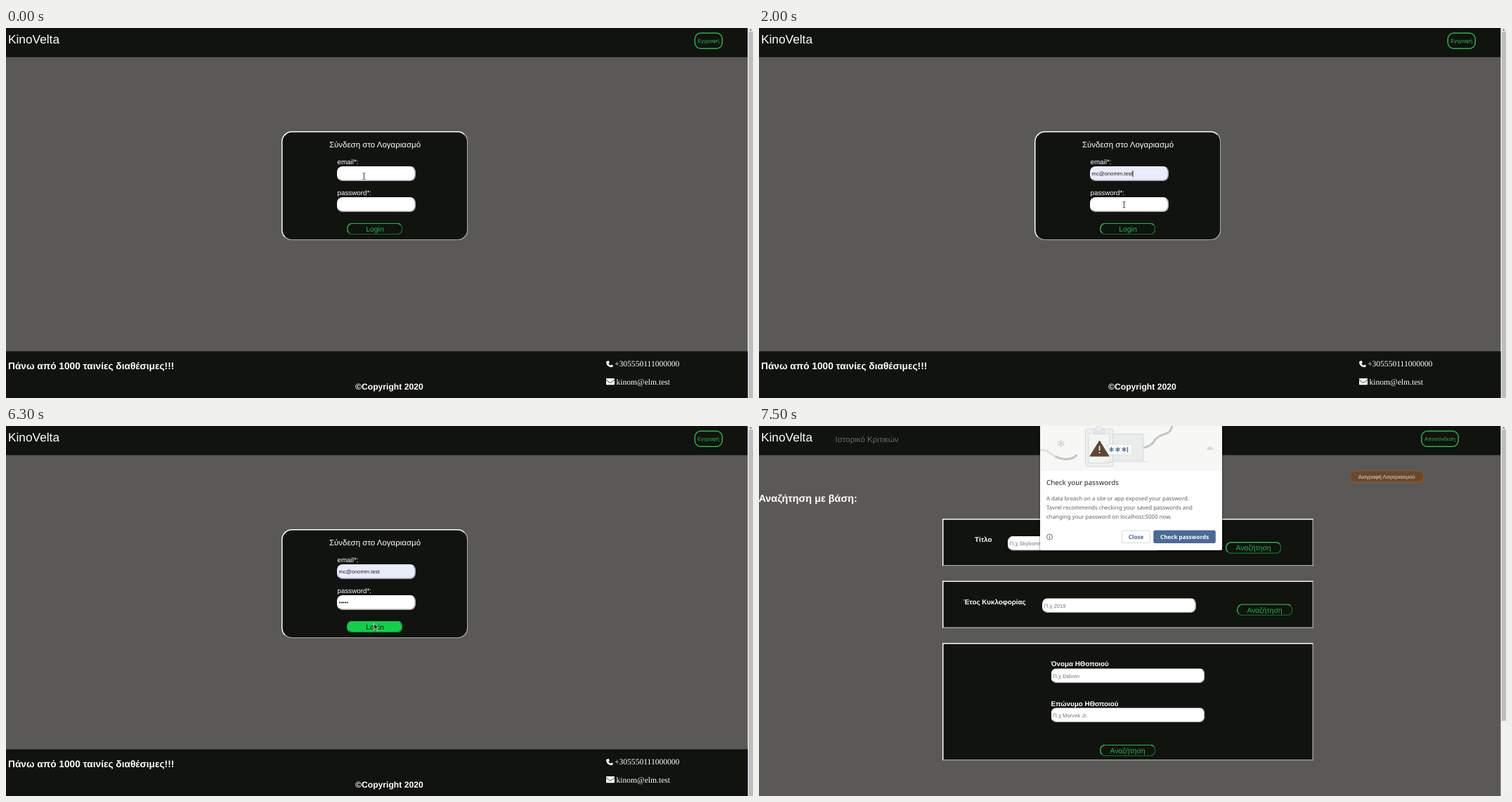
Animation, 1063 px wide and 527 px high, one loop 7700 ms. Source, as an HTML page:

```html
<!DOCTYPE html>
<html lang="el">
<head>
<meta charset="utf-8">
<title>KinoVelta</title>
<style>
html, body { margin: 0; width: 100%; height: 100%; overflow: hidden; background: #5a5957; }
#stage { position: absolute; left: 0; top: 0; width: 1063px; height: 527px; overflow: hidden; background: #5a5957; }
.layer, svg { position: absolute; left: 0; top: 0; width: 1063px; height: 527px; overflow: hidden; }
.box { position: absolute; left: 0; top: 0; box-sizing: border-box; transform-origin: 0 0; }
.dark { background: #10130e; }
.panel { background: #10130e; border: 3px solid; border-color: #fff #a2a2a0 #a2a2a0 #fff; }
.round { border-radius: 30px; }
.input { background: #fff; border: 3px solid; border-color: #fff #a9a9ab #a9a9ab #fff; border-radius: 16px; }
.filled { background: #e8ecfb; border-color: #e8ecfb #9d9fac #9d9fac #e8ecfb; }
.button { border: 3px solid; border-color: #28b550 #16602d #16602d #28b550; border-radius: 16px; }
.hover { background: #10d048; border-color: #10d048 #0a8530 #0a8530 #10d048; }
.pill { border: 3px solid #27b44e; border-radius: 18px; }
.delete { background: #69492e; border: 3px solid; border-color: #7d5433 #8a5a34 #8a5a34 #7d5433; border-radius: 18px; }
.menu { background: #fff; border-radius: 5px; box-shadow: 0 1px 4px #0008; }
.dialog { background: #fff; border-radius: 0 0 4px 4px; box-shadow: 0 2px 6px #0009; }
.close { border: 2px solid #d6d8da; border-radius: 5px; }
.check { background: #4a6a94; border-radius: 5px; }
text { font-family: "Liberation Sans", Arial, sans-serif; fill: #fff; white-space: pre; text-rendering: geometricPrecision; }
.bold { font-weight: 700; }
.serif { font-family: "Liberation Serif", Times, serif; }
.ui { font-family: "Noto Sans", "Open Sans", sans-serif; font-weight: 500; fill: #5f6062; }
.item { font-weight: 600; fill: #282828; }
.title { fill: #222; }
.green { fill: #28b550; }
.value { fill: #222; }
.hint { fill: #757575; }
.faded { fill: #bcb3a8; text-shadow: .6px .4px 0 #bcb3a8aa; }
.blue { font-weight: 600; fill: #46668f; }
.white { font-weight: 600; fill: #fff; }
</style>
</head>
<body>
<div id="stage"></div>
<script>
const LOOP = 7700;
const stage = document.getElementById('stage');
const NS = 'http://www.w3.org/2000/svg';

function layer(parent = stage) {
  const el = document.createElement('div');
  el.className = 'layer';
  parent.append(el);
  return el;
}

// Boxes are built at double size and halved, which keeps fractions of a pixel.
const place = (el, x, y) => { el.style.transform = `translate(${x}px, ${y}px) scale(.5)`; };

function box(parent, x, y, w, h, cls, fill = '') {
  const el = document.createElement('div');
  el.className = 'box ' + cls;
  el.style.width = w * 2 + 'px';
  el.style.height = h * 2 + 'px';
  el.style.background = fill;
  place(el, x, y);
  parent.append(el);
  return el;
}

function drawing(parent, markup = '') {
  const svg = document.createElementNS(NS, 'svg');
  svg.innerHTML = markup;
  parent.append(svg);
  return svg;
}

function text(svg, x, y, size, content, cls = '', anchor = 'start') {
  const el = document.createElementNS(NS, 'text');
  el.setAttribute('x', x);
  el.setAttribute('y', y);
  el.setAttribute('font-size', size);
  el.setAttribute('class', cls);
  el.setAttribute('text-anchor', anchor);
  el.textContent = content;
  svg.append(el);
  return el;
}

const centered = (svg, x, y, size, content, cls) => text(svg, x, y, size, content, cls, 'middle');

const SMALL = 7.7, LABEL = 9.8, BUTTON = 10.4, LINK = 11.55;
const INPUT_HEIGHT = 21, BUTTON_SIZE = [79.5, 17];
const MAILS = ['nel@onomm.test', 'mc@onomm.test', 'zorv@onomm.test',
  'veltomirapanthelokaroud@nimo.test', 'qel@nimo.test', 'taskwander@nimel'];

// Shared frame
const base = layer();
box(base, 0, 0, 1055.5, 41.5, 'dark');
text(drawing(base), 3, 22, 17.3, 'KinoVelta');
box(base, 1055.5, 0, 7.5, 527, '', '#f1f1f1');
const thumb = box(base, 1057, 5, 6, 522, '', '#bdbdbd');
drawing(base, '<path d="M1057.5 3.5l2.2-2.5 2.2 2.5z" fill="#777"/>');

// Login page
const login = layer();
box(login, 0, 460.5, 1055.5, 66.5, 'dark');
box(login, 979.5, 6.5, 40.5, 23.5, 'pill');
box(login, 392, 147, 265.5, 155.5, 'panel round');
const mailInput = box(login, 471, 197, 112, INPUT_HEIGHT, 'input');
box(login, 471, 241, 112, INPUT_HEIGHT, 'input');
const loginButton = box(login, 485, 277.5, ...BUTTON_SIZE, 'button');
const form = drawing(login, `
  <path d="M855.6 474.4l2-.6 1.2 2.9-1.4 1.2q.9 2 2.9 2.9l1.2-1.4 2.4 1.1-.6 2.1q-.5.8-1.8.7-7-.6-7.5-7.5 0-1.1 1.6-1.4z" fill="#fff"/>
  <rect x="854" y="499" width="12" height="9.2" rx="1" fill="#fff"/>
  <path d="M854 501.3q3 2.3 6 4 3-1.7 6-4" fill="none" stroke="#10130e" stroke-width=".8"/>`);
centered(form, 999.7, 20.5, SMALL, 'Εγγραφή', 'green');
centered(form, 525, 170, 11.5, 'Σύνδεση στο Λογαριασμό');
text(form, 471.5, 194.3, LABEL, 'email*:');
text(form, 471.5, 238.3, LABEL, 'password*:');
const loginLabel = centered(form, 525, 289.7, BUTTON, 'Login', 'green');
const mailText = text(form, 473.5, 210.2, SMALL, '', 'value');
const dots = text(form, 473.7, 254, SMALL, '', 'value');
text(form, 3, 486, 13.7, 'Πάνω από 1000 ταινίες διαθέσιμες!!!', 'bold');
text(form, 497, 515, 12.15, '©Copyright 2020', 'bold');
text(form, 866, 482.3, 11.57, '+305550111000000', 'serif');
text(form, 868.5, 507.5, 11.57, 'kinom@elm.test', 'serif');
const caret = box(login, 473.5, 203, 1, 9, '', '#222');

const menu = layer(login);
box(menu, 471, 219, 181, 134, 'menu');
const highlight = box(menu, 471, 244, 181, 21, '', '#c6c6c4');
const menuText = drawing(menu);
MAILS.forEach((mail, i) => text(menuText, 478, 237.4 + 20.8 * i, 9, mail, 'ui item'));

// Search page
const search = layer();
box(search, 942, 6.5, 54, 23.5, 'pill');
box(search, 840.5, 63, 106.5, 18, 'delete');
[[132, 67.5], [220.5, 67.5], [309, 167.5]].forEach(([y, h]) => box(search, 261, y, 528, h, 'panel'));
const page = drawing(search);
const reviews = text(page, 108.5, 22.5, LINK, 'Ιστορικό Κριτικών');
centered(page, 969, 20.5, SMALL, 'Αποσύνδεση', 'green');
centered(page, 893, 74.5, SMALL, 'Διαγραφή Λογαριασμού', 'faded');
text(page, -.5, 108, 14.4, 'Αναζήτηση με βάση:', 'bold');
const fields = [
  [307, 165.3, 'Τίτλο', 354, 156.7, 'Skyborns: Duskend'],
  [291, 254, 'Έτος Κυκλοφορίας', 403, 245.2, '2019'],
  [415.5, 342.3, 'Όνομα ΗΘοποιού', 415.5, 345.2, 'Dalven'],
  [415.5, 398.5, 'Επώνυμο ΗΘοποιού', 415.5, 401.2, 'Morvek Jr.']
];
fields.forEach(([x, y, label, left, top]) => {
  text(page, x, y, LABEL, label, 'bold');
  box(search, left, top, 219, INPUT_HEIGHT, 'input');
});
const pageTop = drawing(search);
fields.forEach(([, , , left, top, hint]) => text(pageTop, left + 2.7, top + 13.3, SMALL, 'Π.χ ' + hint, 'hint'));
[[664, 165], [680, 253.3], [485, 453.5]].forEach(([x, y]) => {
  box(search, x, y, ...BUTTON_SIZE, 'button');
  centered(pageTop, x + 39.5, y + 12.2, BUTTON, 'Αναζήτηση', 'green');
});

// Password warning
const dialog = layer(search);
box(dialog, 400, -5, 259, 182, 'dialog');
box(dialog, 400, 0, 259, 64, '', '#f7f8f6');
box(dialog, 516, 148.5, 41, 18.5, 'close');
const check = box(dialog, 561.3, 148.5, 88.5, 18.5, 'check');
const notice = drawing(dialog, `
  <g fill="none" stroke="#c3c5c5" stroke-width="3">
    <path d="M400 34q9 0 15 5 9 8 21 8 11 0 16-6" stroke="#dfe1e0"/><path d="M422 43q8 5 18 4 8 0 12-6"/>
    <path d="M547 31q12-2 17-12 5-5 12-7 10-2 12-12"/></g>
  <g stroke="#d0d4d3" stroke-width=".8">
    <rect x="464.5" y="4" width="39.5" height="54" rx="3" fill="#edf0ee"/>
    <rect x="469" y="11" width="30" height="42" fill="#f3f5f3"/>
    <rect x="476" y="4" width="16" height="7" rx="2" fill="#e4e8e6"/><circle cx="484" cy="4" r="4.5" fill="#edf0ee"/>
    <rect x="504" y="11.5" width="43" height="37.5" fill="#e9edeb"/>
    <path d="M490 51h64" fill="none"/></g>
  <rect x="496" y="26" width="35" height="15" fill="#f8faf9" stroke="#d2d7d8" stroke-width=".7"/>
  <path d="M484.5 21l13.5 22h-27z" fill="#5f4632" stroke="#5f4632" stroke-linejoin="round"/>
  <path d="M484.5 28.5v6.5M484.5 37v1.8" stroke="#fff" stroke-width="1.6"/>
  <path id="star" d="M501.5 30v7M498.5 31.8l6 3.5M498.5 35.3l6-3.5" stroke="#46668f" stroke-width="1.2"/>
  <use href="#star" x="9"/><use href="#star" x="18"/>
  <path d="M524.5 30v7.5" stroke="#46668f" stroke-width="1.2"/>
  <path d="M429.5 19.5v11M424.7 22.2l9.6 5.6M424.7 27.8l9.6-5.6" stroke="#d5d8d6" stroke-width="2"/>
  <path d="M637 34a4.7 4.7 0 0 1 9.4 0z" fill="#d8dbda"/>
  <circle cx="413.5" cy="158" r="4" fill="none" stroke="#5c5d5e" stroke-width=".9"/>
  <path d="M413.5 155.5v1M413.5 157.3v3" stroke="#5c5d5e"/>`);
text(notice, 409, 83.8, 9.8, 'Check your passwords', 'ui title');
['A data breach on a site or app exposed your password.',
  'Tavrel recommends checking your saved passwords and',
  'changing your password on localhost:5000 now.'
].forEach((line, i) => text(notice, 409, 106 + 12.8 * i, 7.9, line, 'ui'));
centered(notice, 536.5, 160.8, 8.1, 'Close', 'ui blue');
centered(notice, 605.6, 160.8, 8.1, 'Check passwords', 'ui white');

// Pointers, drawn around their hot spot
const pointers = drawing(stage, `
  <g id="beam" fill="none"><path d="M-2-4.5q2 0 2 1v7q0 1-2 1M2-4.5q-2 0-2 1v7q0 1 2 1" stroke="#fff" stroke-width="1.6" opacity=".5"/>
    <path d="M-2-4.5q2 0 2 1v7q0 1-2 1M2-4.5q-2 0-2 1v7q0 1 2 1" stroke="#333" stroke-width=".8"/></g>
  <path id="arrow" d="M0 0v9.3l2.2-2 1.6 3.6 1.5-.7-1.6-3.4h3z" fill="#222" stroke="#fff" stroke-width=".8"/>`);
const beam = pointers.querySelector('#beam');
const arrow = pointers.querySelector('#arrow');

// Each row: start time, then the values held until the next row
const POINTER = [
  [0, 509.5, 211], [900, 510, 214], [1000, 512, 222], [1100, 514, 231], [1200, 517, 240],
  [1300, 520, 249], [1400, 521, 253.5], [1700, 521.5, 254.5], [1800, 519.5, 251.5],
  [2200, 519.5, 252], [2500, 519, 252.7], [5100, 519, 255], [5200, 519.5, 260],
  [5300, 521, 267], [5400, 522, 274], [5500, 523, 279], [5600, 523.5, 281]
];
const CHOICE = [[0, -1], [1100, 0], [1300, 1]];
const MENU = [[0, 0], [400, 1], [1800, .12], [2000, 0]];
const TYPED = [[0, 0], [3100, 1], [3400, 2], [3800, 3], [4200, 4], [4600, 5]];
const CARET = [[0, 0], [400, 1], [900, 0], [1800, 1], [2800, 0], [3100, 1], [5100, 0], [5600, 1], [5800, 0]];
const DIALOG = [[0, 0], [6600, .3], [6700, .7], [6800, .93], [6900, 1]];

const at = (rows, t) => rows.filter(row => row[0] <= t).pop().slice(1);
const show = (el, on) => { el.style.display = on ? '' : 'none'; };

function render(t) {
  const onSearch = t >= 6400;
  show(login, !onSearch);
  show(search, onSearch);
  thumb.style.height = (onSearch ? 415 : 522) * 2 + 'px';

  const [choice] = at(CHOICE, t);
  mailText.textContent = MAILS[choice] || '';
  mailInput.classList.toggle('filled', choice >= 0);
  menu.style.opacity = at(MENU, t)[0];
  show(highlight, choice >= 0);
  place(highlight, 471, 223.2 + 20.8 * choice);

  const [typed] = at(TYPED, t);
  dots.textContent = '•'.repeat(typed);
  const inPassword = t >= 2500;
  const caretX = inPassword ? 473.3 + 2.7 * typed : choice < 0 ? 473.3 : 531.5;
  show(caret, at(CARET, t)[0]);
  place(caret, caretX, inPassword ? 247 : 203);

  const hover = t >= 5400;
  loginButton.classList.toggle('hover', hover);
  loginLabel.style.fill = hover ? '#10130e' : '';

  const [shown] = at(DIALOG, t);
  dialog.style.opacity = shown;
  const tone = Math.round(255 - 149 * shown);
  reviews.style.fill = `rgb(${tone},${tone},${tone})`;
  check.style.background = t >= 7500 ? '' : '#40618e';

  const [x, y] = at(POINTER, t);
  const asArrow = t >= 5300;
  show(beam, !asArrow);
  show(arrow, asArrow && t < 6600);
  (asArrow ? arrow : beam).setAttribute('transform', `translate(${x} ${y})`);
}

const start = performance.now();
function tick() {
  render((performance.now() - start) % LOOP);
  requestAnimationFrame(tick);
}
tick();
</script>
</body>
</html>
```
